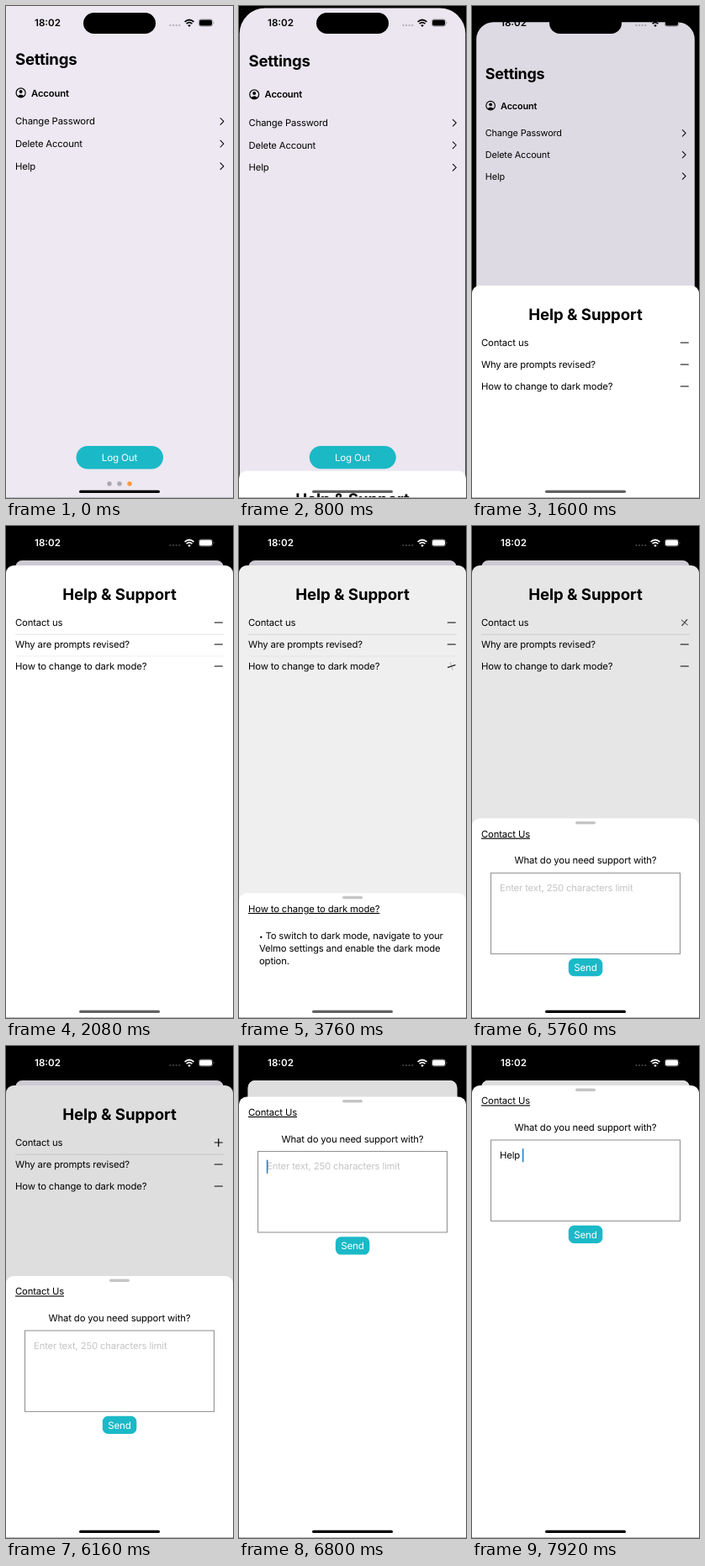
An HTML page for the animation above (8 s loop, 270 px wide and 586 px high).

```html
<!DOCTYPE html>
<html lang="en">
<head>
<meta charset="utf-8">
<title>Settings and help sheets</title>
<style>
html, body { margin: 0; width: 100%; height: 100%; overflow: hidden; background: #000; }
svg { display: block; width: 100%; height: 100%; }
text { font: 400 11.3px Inter, "Open Sans", sans-serif; letter-spacing: -.15px; white-space: pre; text-rendering: geometricPrecision; }
.title { font-size: 18.6px; font-weight: 700; }
.semi { font-weight: 600; }
.mid { text-anchor: middle; }
.link { text-decoration: underline; text-decoration-thickness: .8px; text-underline-offset: 1.5px; }
.faint { text-decoration-color: #bbb; }
.line { fill: none; stroke: #000; stroke-width: 1.2; stroke-linecap: round; stroke-linejoin: round; }
.thin { stroke-width: 1.05; }
</style>
</head>
<body>
<svg viewBox="0 0 270 586" preserveAspectRatio="none">
  <rect width="270" height="586"/>
  <g id="settings">
    <path id="settingsBg" fill="#ede8f2"/>
    <text class="title" x="11" y="70" style="letter-spacing:-.27px">Settings</text>
    <circle class="line" cx="17.6" cy="103.4" r="5.5"/>
    <path d="M13.9 107.2Q17.6 103.6 21.3 107.2L19.6 108.3H15.6Z"/>
    <circle cx="17.6" cy="102" r="2"/>
    <text class="semi" x="30" y="107.5">Account</text>
    <g id="menu"></g>
    <rect x="83.5" y="524" width="103.5" height="27.5" rx="13.75" fill="#1bb9c7"/>
    <text class="mid" x="135" y="542" fill="#fff" style="font-size:11.6px">Log Out</text>
    <g fill="#aaa7ae">
      <circle cx="123" cy="569" r="2.7"/>
      <circle cx="135" cy="569" r="2.7"/>
      <circle cx="147" cy="569" r="2.7" fill="#ff9a3c"/>
    </g>
    <path id="settingsDim"/>
  </g>

  <g id="help">
    <path id="helpBg" fill="#fff"/>
    <text class="title mid" x="135" y="40.7" style="letter-spacing:-.07px">Help &amp; Support</text>
    <path id="rule0" d="M11 82.2H259" stroke="#dcdcdc" stroke-width=".8"/>
    <path id="rule1" d="M11 108H259" stroke="#ebebeb" stroke-width=".8"/>
    <g id="topics"></g>
    <path id="helpDim"/>
  </g>

  <g id="detail">
    <path id="detailBg" fill="#fff"/>
    <rect x="123" y="3.4" width="24" height="3.6" rx="1.8" fill="#c5c5c7"/>
    <g id="answer">
      <text class="link faint" x="11" y="22.6">How to change to dark mode?</text>
      <text x="24" y="54.8"><tspan font-size="8" style="font-size:8px">•</tspan> To switch to dark mode, navigate to your</text>
      <text x="24" y="70">Velmo settings and enable the dark mode</text>
      <text x="24" y="85.2">option.</text>
    </g>
    <g id="contact">
      <text class="link" x="11" y="22.4">Contact Us</text>
      <text class="mid" x="135" y="54.2">What do you need support with?</text>
      <rect x="22.5" y="65" width="225" height="96.4" fill="none" stroke="#8c8c8c"/>
      <text id="hint" x="33" y="86.8" fill="#c4c4c6">Enter text, 250 characters limit</text>
      <text id="typed" x="33" y="86.8"></text>
      <rect id="caret" y="75" width="1.6" height="16.6" rx=".8" fill="#1a86d9"/>
      <rect x="114.8" y="166.8" width="40.5" height="21.2" rx="6.5" fill="#1bb9c7"/>
      <text class="mid" x="135" y="181.6" fill="#fff" style="font-size:11.6px">Send</text>
    </g>
  </g>

  <rect x="92" y="8" width="86" height="25" rx="12.5"/>
  <g id="status">
    <text class="semi mid" x="49.5" y="24" style="font-size:11.6px;letter-spacing:0">18:02</text>
    <g opacity=".28">
      <circle cx="195.4" cy="23" r="1.1"/><circle cx="199" cy="23" r="1.1"/>
      <circle cx="202.6" cy="23" r="1.1"/><circle cx="206.2" cy="23" r="1.1"/>
    </g>
    <g id="wifi" fill="none" stroke-width="1.7">
      <path d="M212.6 18.9Q218 14.1 223.4 18.9"/>
      <path d="M214.6 21.2Q218 18.2 221.4 21.2"/>
    </g>
    <path d="M216.2 23Q218 21.6 219.8 23L218 24.9Z"/>
    <rect id="shell" x="229.2" y="15.8" width="16.6" height="8.4" rx="2.6" fill="none" stroke-width=".7" stroke-opacity=".4"/>
    <rect x="230" y="16.6" width="15" height="6.8" rx="1.9"/>
    <path d="M246.8 18.6Q248.2 20 246.8 21.4Z" opacity=".5"/>
  </g>
  <rect id="home" x="87" y="576.7" width="96" height="3.4" rx="1.7"/>
  <rect y="585" width="270" height="1" fill="#b9b9bc"/>
</svg>

<script>
const LOOP = 8000, STEP = 80;
const W = 270, H = 586, TOP = 47, HALF = 274, CARD = 41;
const $ = id => document.getElementById(id);
const set = (id, attrs) => {
  for (const k in attrs) $(id).setAttribute(k, attrs[k]);
};
const mix = (a, b, p) => a + (b - a) * p;
const clamp = x => Math.max(0, Math.min(1, x));

// Critically damped spring; rate is per ms, and it rests at `end`.
function spring(t, start, rate, end) {
  if (t >= end) return 1;
  const x = Math.max(0, t - start) * rate;
  return 1 - (1 + x) * Math.exp(-x);
}

function ease(t, start, length = 350) {
  const x = clamp((t - start) / length);
  return x * x * (3 - 2 * x);
}

// Panel outline with separate top and bottom corner radii.
function panel(h, a, b = 0) {
  return `M0 ${a}A${a} ${a} 0 0 1 ${a} 0H${W - a}A${a} ${a} 0 0 1 ${W} ${a}V${h - b}` +
    `A${b} ${b} 0 0 1 ${W - b} ${h}H${b}A${b} ${b} 0 0 1 0 ${h - b}Z`;
}

$("menu").innerHTML = ["Change Password", "Delete Account", "Help"].map((label, i) => {
  const y = 137.4 + i * 26.7;
  return `<text x="11" y="${y + 4}">${label}</text>
    <path class="line thin" d="M255 ${y - 3.9}l3.9 3.9l-3.9 3.9"/>`;
}).join("");

$("topics").innerHTML = ["Contact us", "Why are prompts revised?", "How to change to dark mode?"].map((label, i) => {
  const y = 68 + i * 26;
  return `<text x="11" y="${y + 4}">${label}</text>
    <g transform="translate(252.8 ${y})"><g id="icon${i}" class="line">
      <path id="minus${i}" d="M-4.5 0H4.5"/><path id="plus${i}" d="M-4.5 0H4.5M0-4.5V4.5"/>
    </g></g>`;
}).join("");

function turnIcon(i, p) {
  set("icon" + i, { transform: `rotate(${-90 * p})` });
  set("minus" + i, { opacity: 1 - p });
  set("plus" + i, { opacity: p });
}

// Scale a page back into a card behind the sheet above it.
function recede(id, p, from) {
  const s = 1 - .082 * p;
  set(id, { transform: `translate(${W / 2 * (1 - s)} ${mix(from, CARD, p)}) scale(${s})` });
}

function helpOpen(t) {
  if (t < 800) return 0;
  if (t < 1600) return .06;
  return spring(t, 1494.5, .015, 2080);
}

function detailOpen(t) {
  if (t < 4800) return spring(t, 3653, .015, 4160);
  if (t < 5280) return 1 - spring(t, 4750, .018, 5120);
  return spring(t, 5552.5, .0133, 6160);
}

const typing = [[7920, "Help "], [7760, "Help"], [7680, "Hel"], [7440, "He"], [7280, "H"], [0, ""]];

function draw(time) {
  const t = Math.floor(time / STEP) * STEP;
  const open = helpOpen(t), half = detailOpen(t), full = spring(t, 6498, .015, 7360);

  recede("settings", open, 0);
  const base = panel(H / .9, open ? mix(32, 9, open) : 0);
  set("settingsBg", { d: base });
  set("settingsDim", { d: base, opacity: .13 * open });

  recede("help", full, mix(H, TOP, open));
  const sheet = panel(640, 9);
  set("helpBg", { d: sheet });
  set("helpDim", { d: sheet, opacity: .13 * half });
  set("rule0", { opacity: ease(t, 1600) });
  set("rule1", { opacity: ease(t, 1600) - ease(t, 3660) });
  turnIcon(0, ease(t, 5570));
  turnIcon(1, 0);
  turnIcon(2, ease(t, 3660) - ease(t, 5250));

  const y = mix(mix(H, HALF, half), TOP, full);
  const held = t >= 4480 && t < 5280;
  set("detail", { transform: `translate(0 ${y})`, visibility: half ? "visible" : "hidden" });
  set("detailBg", { d: held ? panel(H - HALF, 9, 38) : panel(640, 9) });
  const asking = t >= 5280;
  set("answer", { display: asking ? "none" : "inline" });
  set("contact", { display: asking ? "inline" : "none" });

  const text = typing.find(([at]) => t >= at)[1];
  $("typed").textContent = text;
  set("hint", { display: text ? "none" : "inline" });
  const width = asking && text ? $("typed").getComputedTextLength() : 0;
  set("caret", { x: 32.8 + width, display: t >= 6560 ? "inline" : "none" });

  const v = Math.round(255 * clamp((t - 1600) / 320));
  const ink = `rgb(${v},${v},${v})`;
  set("status", { fill: ink });
  set("wifi", { stroke: ink });
  set("shell", { stroke: ink });
  set("home", { fill: t >= 800 && t < 5280 ? "#606060" : "#000" });
}

const began = performance.now();
function tick() {
  draw((performance.now() - began) % LOOP);
  requestAnimationFrame(tick);
}
tick();
</script>
</body>
</html>
```
